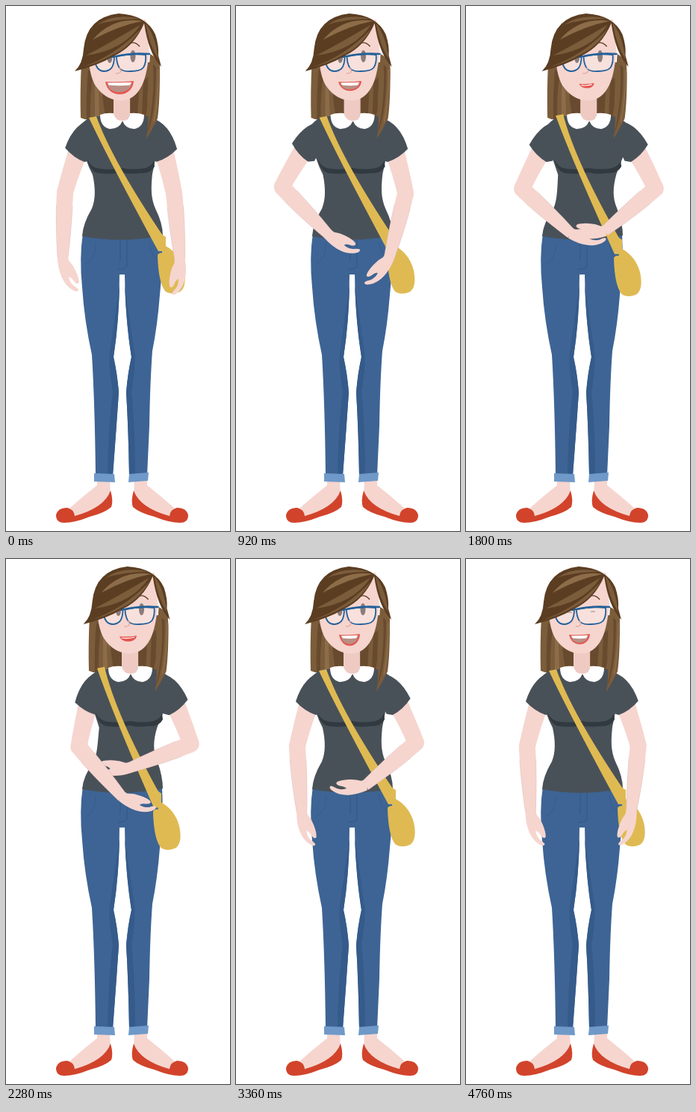
An HTML page with a canvas that plays this animation: 300 px wide and 700 px high, repeating every 4.8 s.

```html
<!DOCTYPE html>
<html lang="en">
<head>
<meta charset="utf-8">
<title>Talking woman</title>
<style>
html, body { margin: 0; width: 100%; height: 100%; overflow: hidden; background: #fff; }
canvas { display: block; }
</style>
</head>
<body>
<canvas id="stage" width="300" height="700"></canvas>
<script>
const c = document.getElementById('stage').getContext('2d');
const LOOP = 4800, STEP = 40, RAD = Math.PI / 180;
const SKIN = '#f6d5cf', SHIRT = '#495158', DARK = '#313a40', JEANS = '#3d6494',
  SEAM = '#355b8b', CUFF = '#6f99c8', RED = '#d2432b', GOLD = '#dfba53',
  BROWN = '#5b3d22', SHADE = '#684a2e', MID = '#7b5c3b', LIGHT = '#8d6d49', BLUE = '#23609a';

// time, sway, left arm (upper, fore, hand), right arm (same, mirrored), mouth half width, mouth height
const KEYS = [
  [0, 0, -16, -2, 16, -12, -5, 2, 19, 17],
  [400, 0, -30, 44, 48, -12, 11, 30, 18, 14],
  [840, 0, -29, 44, 52, -12, 11, 30, 16, 13],
  [1120, 3, -28, 46, 60, -17, 28, 50, 13, 10],
  [1360, 6, -27, 48, 70, -24, 46, 82, 10, 6],
  [1720, 9, -26, 48, 72, -26, 49, 84, 10, 6],
  [2280, 11, -11, 41, 63, -20, 69, 84, 11.5, 7],
  [2840, 0, -14, 4, 12, -23, 50, 78, 14, 16],
  [3400, 0, -14, 4, 12, -23, 50, 78, 14, 15],
  [3880, 0, -14, 3, 13, -15.8, 6, 11, 14, 13]
];

function poseAt(t) {
  const i = KEYS.findIndex(k => k[0] > t);
  if (i < 0) return KEYS[KEYS.length - 1];
  const a = KEYS[i - 1], b = KEYS[i];
  const p = (t - a[0]) / (b[0] - a[0]), e = p * p * (3 - 2 * p);
  return a.map((v, n) => v + (b[n] - v) * e);
}

function eyeOpen(t) {
  return t >= 4640 ? (4760 - t) / 160 : Math.min(1, Math.abs(t - 440) / 120);
}

function fill(d, color) {
  c.fillStyle = color;
  c.fill(new Path2D(d));
}

function line(d, color, width) {
  c.strokeStyle = color;
  c.lineWidth = width;
  c.stroke(new Path2D(d));
}

function oval(x, y, rx, ry, color) {
  c.fillStyle = color;
  c.beginPath();
  c.ellipse(x, y, rx, ry, 0, 0, 7);
  c.fill();
}

function group(x, y, draw, side = 1) {
  c.save();
  c.translate(x, y);
  c.scale(side, 1);
  draw();
  c.restore();
}

function foot() {
  fill('M122 632 L139 632 L140 654 Q132 668 92 682 L86 669 Q104 653 122 639Z', SKIN);
  fill('M67 679 Q69 669 82 669 Q91 671 92 680 Q132 669 140 646 Q144 660 141 668 ' +
    'Q132 676 112 681 Q92 689 78 689 Q67 689 67 679Z', RED);
}

function legs() {
  group(0, 0, foot);
  group(311, 0, foot, -1);
  fill('M103 303 L209 303 Q211 340 206 385 Q203 425 196 460 Q193 500 192 560 L189 626 L165 626 ' +
    'Q164 565 161 515 Q163 490 168 468 Q160 420 159 358 L152 358 Q152 418 144 468 ' +
    'Q149 490 151 515 Q148 560 143 626 L120 626 Q119 530 115 465 Q105 420 102 375 Q98 335 103 303Z', JEANS);
  fill('M152 372 Q151 422 144 468 Q149 490 151 515 Q148 560 143 626 L136 626 ' +
    'Q137 560 143 515 Q137 480 139 462Z', SEAM);
  fill('M159 372 Q161 424 168 468 Q163 490 161 515 Q164 565 165 626 L173 626 ' +
    'Q173 560 168 515 Q174 480 172 462Z', SEAM);
  line('M162 312 L162 347 Q160 351 150 351 M153 313 L153 340', SEAM, 1.3);
  line('M120 315 Q122 335 107 344 M192 315 Q194 335 206 340', SEAM, .8);
  fill('M118 623 L145 624 L146 635 L118 634Z', CUFF);
  fill('M165 624 L191 622 L190 633 L164 635Z', CUFF);
}

function backHair() {
  fill('M101 75 Q99 115 100 149 Q112 155 130 147 L180 147 Q186 152 188 160 ' +
    'Q206 150 206 75Z', MID);
  fill('M110 85 Q107 120 108 151 L113 151 Q112 115 117 90Z', SHADE);
  fill('M119 95 L145 118 L145 148 L136 148 Q134 125 124 112 L125 148 L119 150Z', LIGHT);
  fill('M128 112 L145 122 L145 148 L133 148Z', SHADE);
  fill('M167 118 L178 112 L176 148 L167 147Z', SHADE);
  fill('M184 100 L190 95 Q192 130 186 151 L182 148Z', SHADE);
}

function shirt(s) {
  const w = s * .25;
  fill(`M${118 + s} 147 Q${101 + s} 151 ${93 + s} 172 L${107 + s} 204 Q${111 + s} 216 ${116 + s * .8} 225
    C${120 + w} 243 ${120 + w} 258 ${115 + w} 270 Q103 290 102 307 Q155 317 210 306
    Q210 290 ${200 + w} 270 C${194 + w} 256 ${194 + w} 243 ${196 + s * .6} 224
    L${200 + s} 204 L${216 + s} 174 Q${208 + s} 152 ${190 + s} 147Z`, SHIRT);
  group(s, 0, () => {
    fill('M109 204 Q113 216 126 217 Q142 219 155 216 Q172 219 187 216 Q196 213 198 206 ' +
      'L199 214 Q194 224 178 223 Q165 225 155 222 Q140 225 124 223 Q112 220 109 204Z', DARK);
    fill('M144 112 L166 112 L166 144 Q164 154 155 154 Q146 154 144 144Z', '#efcac3');
    fill('M126 145 Q134 142 144 143 Q146 153 156 153 Q152 164 139 164 Q126 161 126 145Z', '#fff');
    fill('M185 145 Q176 142 166 143 Q165 153 156 153 Q160 164 172 164 Q185 161 185 145Z', '#fff');
  });
}

function bag(s) {
  const x = -s * .55, y = s * .42, m = s * .4, top = -s * .3;
  fill(`M${111 + s} ${149 + top} L${121 + s} ${147 + top}
    Q${142 + m} 206 ${212 + x} ${309 + y} L${213 + x} ${327 + y} L${204 + x} ${327 + y}
    Q${140 + m} 210 ${111 + s} ${149 + top}Z`, GOLD);
  group(x, y, () => fill('M208 304 L214 308 L214 320 Q232 330 238 351 Q243 374 233 381 ' +
    'Q221 386 213 380 Q204 368 203 333 Q203 329 210 329Z', GOLD));
}

// Limbs are drawn for the left side; the right side is mirrored.
function upperArm(x, side, upper) {
  group(x, 165, () => {
    c.rotate(-upper * RAD);
    fill('M-11 20 Q-12 55 -11 87 L11 87 Q11 60 15 30Z', SKIN);
    c.rotate(-14 * RAD);
    fill('M-23 25 Q-11 38 4 43 L12 40 L21 0 L15 -16 Q-12 -10 -23 25Z', SHIRT);
  }, side);
}

function foreArm(x, side, upper, fore, hand) {
  group(x, 165, () => {
    c.rotate(-upper * RAD);
    c.translate(0, 87);
    c.rotate((upper - fore) * RAD);
    oval(0, 0, 11, 11, SKIN);
    fill('M-11 0 Q-12 38 -7 89 L7 89 Q11 45 11 0Z', SKIN);
    line('M-11 18 Q-11 45 -7 87 M11 18 Q10 50 7 87', 'rgba(150,120,125,.18)', .8);
    c.translate(0, 88);
    c.rotate((fore - hand) * RAD);
    fill('M-7 -1 Q-10 14 -8 25 Q-6 37 1 44 Q7 50 9 46 Q8 43 4 39 Q0 33 1 26 ' +
      'Q4 27 6 33 Q9 40 12 37 Q14 32 12 20 Q11 12 7 5 L7 -1Z', SKIN);
  }, side);
}

function mouth(w, h) {
  const x = 152, y = 101 + Math.max(0, 12 - h) * .45;
  const l = x - w, r = x + w;
  fill(`M${l} ${y} Q${x} ${y + 1} ${r} ${y - 1} C${r - 1} ${y + h * 1.25} ${l + 4} ${y + h * 1.4} ${l} ${y}Z`, '#e5564e');
  if (h < 8) {
    line(`M${l + 3} ${y + 2} Q${x} ${y + 3} ${r - 3} ${y + 1}`, '#fff', 1.2);
    return;
  }
  fill(`M${l + 2} ${y + 1.5} L${r - 2} ${y + .8} C${r - 4} ${y + h} ${l + 6} ${y + h * 1.15} ${l + 2} ${y + 1.5}Z`, '#b98f85');
  fill(`M${l + 3} ${y + 1.5} L${r - 3} ${y + .8} L${r - 5} ${y + 4.5} Q${x} ${y + 6} ${l + 5} ${y + 4.5}Z`, '#fff');
}

function face(open, w, h) {
  fill('M111 60 Q110 88 119 105 Q133 126 154 126 Q172 126 182 106 Q189 92 192 60 L187 18 L130 30Z', SKIN);
  const lenses = new Path2D('M148 67 Q167 63 187 65 Q188 76 184 82 Q180 87 167 87 ' +
    'Q154 88 151 81 Q148 75 148 67Z M119 74 L145 67 Q145 78 141 83 Q137 87 131 87 Q122 87 119 74Z');
  c.fillStyle = '#f8e1dc';
  c.fill(lenses);
  const ry = Math.max(.6, 8 * open), y = 70 - 3 * open;
  oval(139, y + 1, 3.5, ry, '#8a7d7c');
  oval(170, y, 3.5, ry, '#8a7d7c');
  c.strokeStyle = BLUE;
  c.lineWidth = 1.8;
  c.stroke(lenses);
  line('M119 73 Q133 67 148 67 Q168 62 193 64', BLUE, 2.6);
  line('M168 49 Q174 48 179 54', BROWN, 1.4);
  line('M152 82 Q157 90 147 90', '#e5a9a0', 1.4);
  mouth(w, h);
}

function frontHair() {
  fill('M193 64 Q206 70 206 90 Q206 128 203 150 Q196 164 188 177 Q192 156 189 125 Q191 95 193 64Z', MID);
  fill('M197 78 Q200 120 189 171 Q201 142 201 82Z', SHADE);
  line('M204 85 Q204 125 198 154', LIGHT, 1.6);
  fill('M92 87 Q103 77 104 57 Q108 15 151 10 Q188 12 200 38 Q205 53 204 66 L208 81 ' +
    'Q191 64 185 23 Q172 54 144 67 Q124 79 92 87Z', BROWN);
  fill('M116 45 Q143 14 183 20 Q151 26 116 45Z', LIGHT);
  fill('M107 66 Q138 50 180 25 Q158 59 107 66Z', MID);
  fill('M103 81 Q145 67 180 31 Q166 55 143 65 Q124 76 103 81Z', MID);
  fill('M122 25 Q145 9 180 17 Q146 17 122 25Z', MID);
  fill('M187 23 Q200 39 204 71 Q192 53 187 23Z', MID);
}

function draw(t) {
  const [, sway, lu, lf, lh, ru, rf, rh, mw, mh] = poseAt(t);
  const left = 103 + sway, right = 207 + sway;
  c.clearRect(0, 0, 300, 700);
  group(sway, 0, backHair);
  legs();
  upperArm(right, -1, ru);
  upperArm(left, 1, lu);
  shirt(sway);
  bag(sway);
  foreArm(right, -1, ru, rf, rh);
  foreArm(left, 1, lu, lf, lh);
  group(sway * 1.05, 0, () => {
    face(eyeOpen(t), mw, mh);
    frontHair();
  });
}

const start = performance.now();
function tick() {
  const t = (performance.now() - start) % LOOP;
  draw(Math.floor(t / STEP) * STEP);
  requestAnimationFrame(tick);
}
tick();
</script>
</body>
</html>
```
